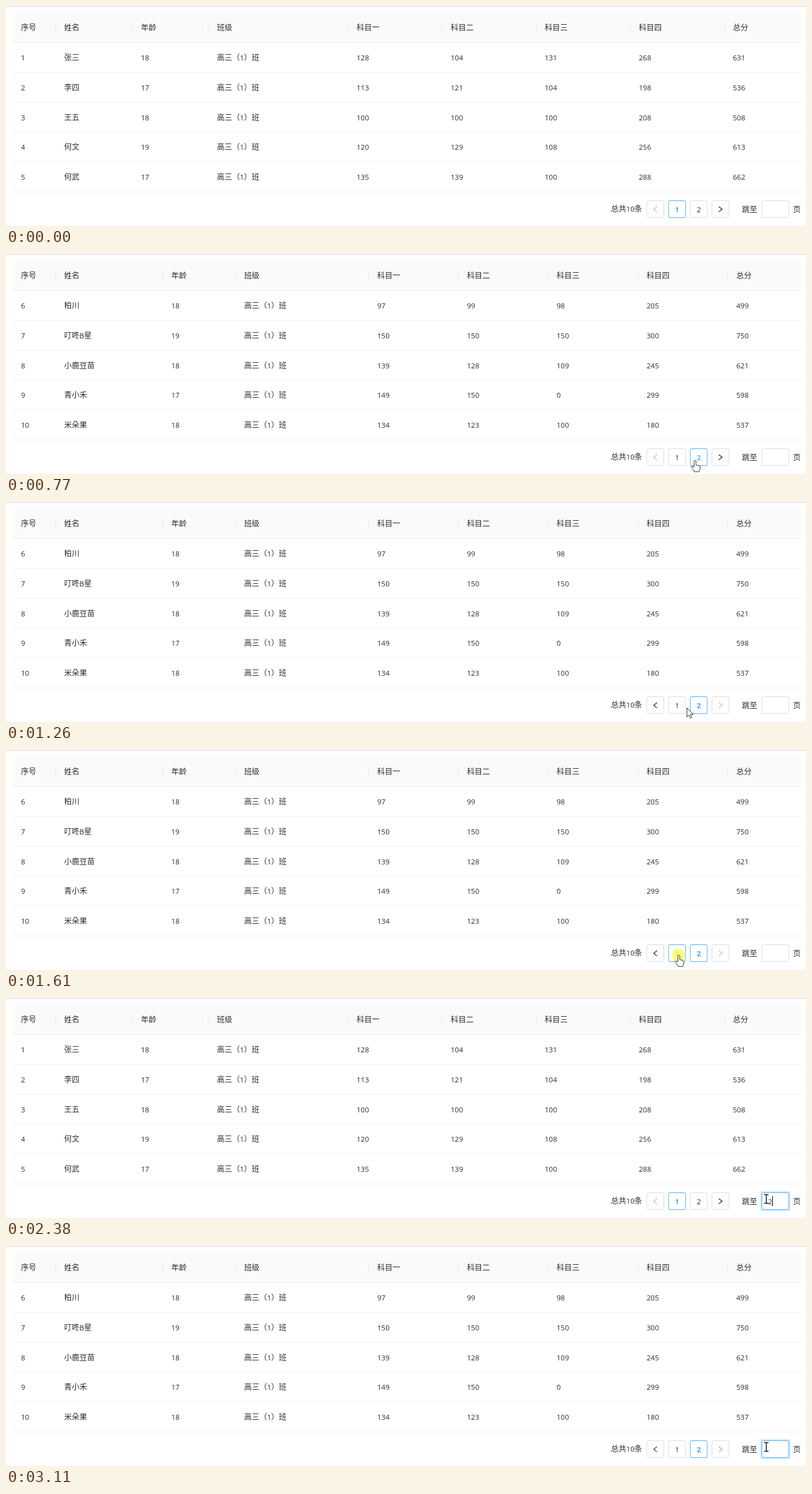
An HTML page with a canvas for the animation above (3.31 s loop, 1280 by 352 pixels).

```html
<!DOCTYPE html>
<html lang="zh">
<head>
<meta charset="utf-8">
<title>成绩表</title>
<style>
html, body { margin: 0; width: 100%; height: 100%; overflow: hidden; background: #fff; }
canvas { display: block; }
</style>
</head>
<body>
<canvas id="stage" width="1280" height="352"></canvas>
<script>
const ctx = document.getElementById('stage').getContext('2d');
const LOOP = 3310, STEP = 70;
const TEXT = '#2b2b2b', BLUE = '#1890ff', HOVER = '#40a9ff', BORDER = '#d9d9d9';
// Latin digits run a little smaller than the Chinese glyphs.
const CJK_FONT = '12.22px "Noto Sans CJK SC", "Noto Sans CJK", sans-serif';
const LATIN_FONT = '11.5px "Open Sans", "Noto Sans", sans-serif';

const HEADERS = ['序号', '姓名', '年龄', '班级', '科目一', '科目二', '科目三', '科目四', '总分'];
const CLASS = '高三（1）班';
const PAGES = [
  {
    columns: [24, 93, 216, 337.5, 561, 711.5, 862, 1012.5, 1163],
    rows: [
      [1, '张三', 18, CLASS, 128, 104, 131, 268, 631],
      [2, '李四', 17, CLASS, 113, 121, 104, 198, 536],
      [3, '王五', 18, CLASS, 100, 100, 100, 208, 508],
      [4, '何文', 19, CLASS, 120, 129, 108, 256, 613],
      [5, '何武', 17, CLASS, 135, 139, 100, 288, 662]
    ]
  },
  {
    columns: [24, 93, 264.5, 381, 594, 737.5, 881, 1025, 1168.5],
    rows: [
      [6, '柏川', 18, CLASS, 97, 99, 98, 205, 499],
      [7, '叮咚B星', 19, CLASS, 150, 150, 150, 300, 750],
      [8, '小鹿豆苗', 18, CLASS, 139, 128, 109, 245, 621],
      [9, '青小禾', 17, CLASS, 149, 150, 0, 299, 598],
      [10, '米朵果', 18, CLASS, 134, 123, 100, 180, 537]
    ]
  }
];
const BUTTONS = { prev: 1025, one: 1059.7, two: 1094.4, next: 1129.1 };
const BUTTON_TOP = 311, BUTTON_SIZE = 28;

// [time, x, y] of the pointer tip
const POINTER = [
  [70, 1142, 334], [140, 1118, 333], [210, 1098, 337], [280, 1081, 341], [350, 1073, 342],
  [420, 1073, 342], [490, 1091, 329], [560, 1100, 331], [700, 1102, 331], [840, 1102, 328],
  [1050, 1102, 328], [1400, 1080, 329], [1540, 1076, 328], [1680, 1076, 328],
  [1820, 1130, 327], [1960, 1189, 323], [2100, 1213, 321], [2240, 1216, 321], [LOOP, 1216, 321]
];
const SWITCHES = [[770, 2], [1680, 1], [2910, 2]];
const CLICKS = [[630, 770], [1540, 1680], [2240, 2310]];
const FOCUS = 2240, TYPED = 2380, ENTER = 2910;

const ARROW = new Path2D('M0 0V14.3L3.3 11.2L5.5 16.2L7.7 15.2L5.6 10.4H10Z');
const HAND = new Path2D('M-1.5 10.5V1.2a1.5 1.5 0 0 1 3 0V7l5.3 1.2q1.8.5 1.6 2.3l-.9 4.2-1.2 3.2h-7.3l-2-3.8-3.3-4q.4-1.8 2.3-.6z');
const IBEAM = new Path2D('M-3.5-7H-1L0-6L1-7H3.5M0-6V6M-3.5 7H-1L0 6L1 7H3.5');

function text(value, x, y, color = TEXT, weight = 400) {
  ctx.fillStyle = color;
  for (const run of String(value).match(/[\x00-\x7f]+|[^\x00-\x7f]+/g)) {
    ctx.font = `${weight} ${run.charCodeAt(0) < 128 ? LATIN_FONT : CJK_FONT}`;
    ctx.fillText(run, x, y + 4.4);
    x += ctx.measureText(run).width;
  }
}

function rect(x, y, w, h, color) {
  ctx.fillStyle = color;
  ctx.fillRect(x, y, w, h);
}

function outline(x, width, color, lineWidth = .87, grow = 0) {
  ctx.strokeStyle = color;
  ctx.lineWidth = lineWidth;
  ctx.beginPath();
  ctx.roundRect(x + .5 - grow, BUTTON_TOP + .5 - grow, width - 1 + 2 * grow, BUTTON_SIZE - 1 + 2 * grow, 2);
  ctx.stroke();
}

function drawTable({ columns, rows }) {
  rect(0, 0, 1280, 1, '#d4d4d4');
  rect(11, 11, 1261, 47, '#fafaf9');
  HEADERS.forEach((label, i) => {
    text(label, columns[i], 35);
    if (i) rect(Math.round(columns[i] - 14.5), 24, 1, 20, '#ebebeb');
  });
  rect(11, 58, 1261, 1, '#f0f0f0');
  rows.forEach((row, r) => {
    const y = 83 + r * 47.65;
    row.forEach((cell, i) => text(cell, columns[i], y));
    rect(11, Math.round(y + 23), 1261, 1, '#f0f0f0');
  });
}

function drawChevron(name, direction, enabled, hovered) {
  const x = BUTTONS[name], shade = Math.round(191 - 153 * enabled);
  const hot = hovered && enabled > .5;
  outline(x, BUTTON_SIZE, hot ? HOVER : BORDER);
  ctx.strokeStyle = hot ? HOVER : `rgb(${shade},${shade},${shade})`;
  ctx.lineWidth = 1.2;
  ctx.beginPath();
  ctx.moveTo(x + 14 - direction * 2.6, 321);
  ctx.lineTo(x + 14 + direction * 2.6, 325.3);
  ctx.lineTo(x + 14 - direction * 2.6, 329.6);
  ctx.stroke();
}

function drawNumber(name, label, active, hovered) {
  const color = hovered ? HOVER : active ? BLUE : null;
  outline(BUTTONS[name], BUTTON_SIZE, color ? HOVER : BORDER);
  text(label, BUTTONS[name] + 10.8, 325.5, color || TEXT, active ? 600 : 400);
}

function drawInput(t) {
  const focused = t >= FOCUS;
  if (focused) outline(1209, 44, 'rgba(24,144,255,.2)', 2, 1.5);
  outline(1209, 44, focused ? HOVER : BORDER);
  if (t >= TYPED && t < ENTER) text('2', 1219.3, 325.5);
  if (focused && t < ENTER) rect(t >= TYPED ? 1226 : 1219, 317, 1, 16, '#000');
}

function pointerAt(t) {
  if (t < POINTER[0][0]) return null;
  const i = POINTER.findIndex(key => key[0] > t);
  const [t0, x0, y0] = POINTER[i - 1], [t1, x1, y1] = POINTER[i];
  const p = (t - t0) / (t1 - t0);
  return { x: x0 + (x1 - x0) * p, y: y0 + (y1 - y0) * p };
}

function hoveredButton(pointer) {
  if (!pointer || pointer.y > BUTTON_TOP + BUTTON_SIZE) return null;
  return Object.keys(BUTTONS).find(name => pointer.x >= BUTTONS[name] && pointer.x < BUTTONS[name] + BUTTON_SIZE);
}

function drawPointer({ x, y }, hovered, clicking) {
  if (clicking) {
    ctx.fillStyle = 'rgba(255,250,50,.62)';
    ctx.beginPath();
    ctx.arc(x, y, 10.5, 0, 7);
    ctx.fill();
  }
  ctx.save();
  ctx.translate(Math.round(x) + .5, Math.round(y) + .5);
  ctx.strokeStyle = '#222';
  ctx.lineWidth = .9;
  if (x > 1176) {
    ctx.lineWidth = 1.5;
    ctx.stroke(IBEAM);
  } else {
    const shape = hovered ? HAND : ARROW;
    ctx.fillStyle = '#fff';
    ctx.fill(shape);
    ctx.stroke(shape);
  }
  ctx.restore();
}

function pagerState(t) {
  const last = SWITCHES.filter(([time]) => time <= t).pop();
  if (!last) return { page: 1, second: 0 };
  const p = Math.min(1, (t - last[0]) / 300);
  const eased = p < .5 ? 4 * p ** 3 : 1 - 4 * (1 - p) ** 3;
  return { page: last[1], second: last[1] === 2 ? eased : 1 - eased };
}

function quantize(t) {
  if (t < TYPED) return Math.floor(t / STEP) * STEP;
  return t < ENTER ? TYPED : ENTER + Math.floor((t - ENTER) / 66) * 66;
}

function draw(now) {
  const t = quantize(now % LOOP);
  const { page, second } = pagerState(t);
  const pointer = pointerAt(t), hovered = hoveredButton(pointer);
  rect(0, 0, 1280, 352, '#fff');
  drawTable(PAGES[page - 1]);
  text('总共10条', 968, 324.5);
  drawChevron('prev', -1, second, hovered === 'prev');
  drawNumber('one', 1, page === 1, hovered === 'one');
  drawNumber('two', 2, page === 2, hovered === 'two');
  drawChevron('next', 1, 1 - second, hovered === 'next');
  text('跳至', 1177.5, 325.5);
  drawInput(t);
  text('页', 1259.3, 325.5);
  if (pointer) drawPointer(pointer, hovered, CLICKS.some(([from, to]) => t >= from && t < to));
}

const start = performance.now();
function tick() {
  draw(performance.now() - start);
  requestAnimationFrame(tick);
}
tick();
</script>
</body>
</html>
```
